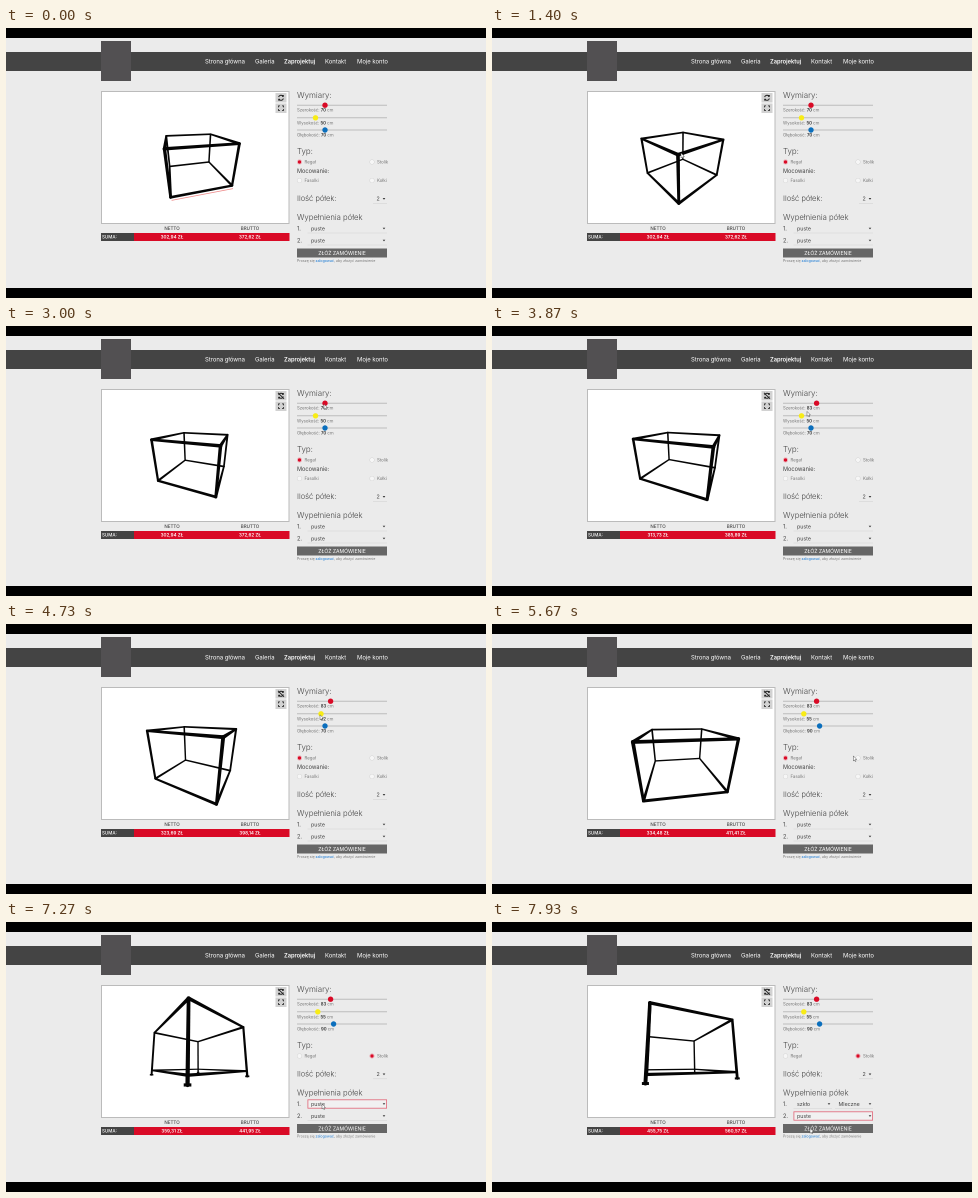
Write an HTML page with a canvas that moves like this. It is 480x270 px and loops after 8000 ms.

```html
<!DOCTYPE html>
<html lang="pl">
<head>
<meta charset="utf-8">
<style>
  html, body { margin: 0; width: 100%; height: 100%; overflow: hidden; background: #000; }
  canvas { display: block; width: 480px; height: 270px; }
</style>
</head>
<body>
<canvas id="stage" width="960" height="540"></canvas>
<script>
const ctx = document.getElementById('stage').getContext('2d');
ctx.scale(2, 2);
const LOOP = 8000;
const RED = '#d90a26', DARK = '#444', INK = '#444', SOFT = '#777', BLACK = '#050505';
const STOP_SPIN = 2150, TABLE_AT = 5950, FOCUS_AT = 6600, GLASS_AT = 7300, SECOND_AT = 7600;

const mix = (a, b, k) => a + (b - a) * k;
const ramp = (t, from, to) => Math.min(1, Math.max(0, (t - from) / (to - from)));

// Everything that moves, as a function of time
function sceneAt(t) {
  const spin = ramp(t, 0, 2750), tilt = ramp(t, TABLE_AT, 6600);
  const yaw = -75 + 53 * spin - 7 * ramp(t, 3500, 4730) + 37 * ramp(t, 4730, 5670)
    + 45 * tilt - 34 * ramp(t, 6750, 7930);
  return {
    t, yaw: yaw * Math.PI / 180,
    pitch: .38 + .06 * Math.sin(Math.PI * spin) - .03 * spin - .5 * tilt,
    w: 70 + 13 * ramp(t, 3100, 3700),
    h: 50 + 12 * ramp(t, 4000, 4400) - 7 * ramp(t, 4750, 4950),
    d: 70 + 38 * ramp(t, 5000, 5150) - 18 * ramp(t, 5150, 5400),
    table: t >= TABLE_AT, glass: t >= GLASS_AT
  };
}

function slidersOf({ w, h, d }) {
  return [
    { label: 'Szerokość', value: w, color: RED, y: 77.2, x: 319 + (w - 70) * .43 },
    { label: 'Wysokość', value: h, color: '#f8ec16', y: 89.8, x: 309.5 + (h - 50) * .46 },
    { label: 'Głębokość', value: d, color: '#0b6fbd', y: 102, x: 319 + (d - 70) * .43 }
  ];
}

function rect(x, y, w, h, color) {
  ctx.fillStyle = color;
  ctx.fillRect(x, y, w, h);
}

function text(str, x, y, size, color = INK, weight = 400, align = 'left') {
  ctx.font = `${weight} ${size}px Inter, "Open Sans", sans-serif`;
  ctx.textAlign = align;
  ctx.fillStyle = color;
  ctx.fillText(str, x, y);
  return x + ctx.measureText(str).width;
}

function line(points, color, width) {
  ctx.beginPath();
  points.forEach(p => ctx.lineTo(p[0], p[1]));
  ctx.strokeStyle = color;
  ctx.lineWidth = width;
  ctx.stroke();
}

function polygon(points, color) {
  ctx.beginPath();
  points.forEach(p => ctx.lineTo(p[0], p[1]));
  ctx.closePath();
  ctx.fillStyle = color;
  ctx.fill();
}

function disc(x, y, r, color) {
  ctx.beginPath();
  ctx.arc(x, y, r, 0, 7);
  ctx.fillStyle = color;
  ctx.fill();
}

const arrowDown = (x, y) => polygon([[x - 1.3, y - .8], [x + 1.3, y - .8], [x, y + .9]], '#333');

function header() {
  rect(0, 0, 480, 270, '#000');
  rect(0, 10, 480, 250, '#ebebeb');
  rect(0, 24, 480, 19, DARK);
  rect(95, 13, 30, 40, '#525052');
  [['Strona główna', 199], ['Galeria', 249], ['Zaprojektuj', 278, 600], ['Kontakt', 319], ['Moje konto', 351]]
    .forEach(([label, x, weight]) => text(label, x, 35.7, weight ? 5.7 : 5.9, '#fff', weight));
}

function viewerFrame(t) {
  rect(95, 63, 188.5, 133, '#bbb');
  rect(96, 64, 186.5, 131, '#fff');
  rect(269.5, 65, 11, 9.5, '#d2d2d2');
  rect(269.5, 75.5, 11, 9.5, '#d2d2d2');
  ctx.strokeStyle = '#222';
  ctx.lineWidth = 1;
  for (const start of [.3, .3 + Math.PI]) {
    ctx.beginPath();
    ctx.arc(275, 69.8, 2.5, start, start + 2.3);
    ctx.stroke();
  }
  rect(276, 67, 1.8, 1.8, '#222');
  rect(272.2, 70.8, 1.8, 1.8, '#222');
  if (t > STOP_SPIN) line([[272, 66.8], [278, 72.8]], '#222', 1);
  for (const sx of [-1, 1]) for (const sy of [-1, 1])
    line([[275 + sx, 80.2 + 2.3 * sy], [275 + 2.5 * sx, 80.2 + 2.3 * sy], [275 + 2.5 * sx, 80.2 + .8 * sy]], '#222', .8);
}

// Orbit camera looking at the middle of the furniture
function makeProjector({ yaw, pitch }) {
  const c = Math.cos(yaw), s = Math.sin(yaw), cp = Math.cos(pitch), sp = Math.sin(pitch);
  return (x, y, z) => {
    const X = x * c + z * s, Z = z * c - x * s;
    const scale = 94 / (124 - Z * cp - y * sp);
    return [189.5 + X * scale, 130 - (y * cp - Z * sp) * scale, scale];
  };
}

function bar(a, b, thickness) {
  const dx = b[0] - a[0], dy = b[1] - a[1], len = Math.hypot(dx, dy) || 1;
  const side = (p, k) => {
    const r = k * p[2] * thickness / 2 / len;
    return [p[0] - dy * r, p[1] + dx * r];
  };
  polygon([side(a, 1), side(b, 1), side(b, -1), side(a, -1)], BLACK);
  for (const p of [a, b]) disc(p[0], p[1], p[2] * thickness / 2, BLACK);
}

function furniture(scene) {
  const { t, w, h, d, table } = scene;
  const project = makeProjector(scene);
  const top = h / 2 + (table ? 2.7 : 0), floor = -top, rail = table ? floor + 6 : floor;
  const corner = (i, y) => {
    const angle = Math.PI / 4 + i * Math.PI / 2;
    return project(Math.sign(Math.sin(angle)) * w / 2, y, Math.sign(Math.cos(angle)) * d / 2);
  };
  if (t < 900) {
    line([0, 1].map(i => corner(i, floor)).map(p => [p[0] + 1, p[1] + 3]), '#e88', .7);
  }
  for (let i = 0; i < 4; i++) {
    bar(corner(i, top), corner(i + 1, top), 2.7);
    bar(corner(i, rail), corner(i + 1, rail), table ? 2.2 : 2.7);
    bar(corner(i, top), corner(i, floor), 2.7);
    if (table) {
      const [x, y, scale] = corner(i, floor);
      rect(x - 2.4 * scale, y - scale, 4.8 * scale, 2 * scale, BLACK);
    }
  }
}

function prices({ w, h, d, table, glass }) {
  const totalLength = Math.round(w) + Math.round(h) + Math.round(d);
  const net = 145.24 + .83 * totalLength + (table ? 24.83 : 0) + (glass ? 96.44 : 0);
  const format = v => v.toFixed(2).replace('.', ',') + ' ZŁ';
  rect(95, 205, 33, 8, DARK);
  rect(128, 205, 155.5, 8, RED);
  text('SUMA:', 96, 210.6, 4.5, '#fff', 500);
  [['NETTO', net, 166], ['BRUTTO', net * 1.23, 244]].forEach(([label, value, x]) => {
    text(label, x, 201.8, 4.5, INK, 500, 'center');
    text(format(value), x, 210.6, 4.5, '#fff', 600, 'center');
  });
}

function slider({ label, value, color, x, y }) {
  line([[291, y], [381, y]], '#bdbdbd', 1);
  disc(x, y, 2.7, color);
  const valueX = text(label + ': ', 291, y + 6.5, 4.3, SOFT);
  const unitX = text(Math.round(value), valueX, y + 6.5, 4.3, '#333', 600);
  text(' cm', unitX, y + 6.5, 4.3, SOFT);
}

function radio(label, x, y, checked) {
  disc(x, y, 2.5, checked ? '#e79aa4' : '#d0d0d0');
  disc(x, y, 2.1, '#f6f6f6');
  if (checked) disc(x, y, 1.7, RED);
  text(label, x + 5, y + 1.6, 4.3, SOFT);
}

function select(label, x, right, y, focused) {
  if (focused) {
    rect(x, y - 6.4, right - x, 9.2, '#e26577');
    rect(x + .8, y - 5.6, right - x - 1.6, 7.6, '#f1f1f1');
  } else {
    line([[x, y + 2.7], [right, y + 2.7]], '#d4d4d4', .6);
  }
  text(label, x + 3.5, y, 5.3);
  arrowDown(right - 3, y - 1.8);
}

function form(scene) {
  const { t, table, glass } = scene;
  text('Wymiary:', 291, 70, 7.9, INK, 300);
  slidersOf(scene).forEach(slider);

  text('Typ:', 291, 126, 7.9, INK, 300);
  radio('Regał', 293.5, 134, !table);
  radio('Stolik', 366, 134, table);
  if (!table) {
    text('Mocowanie:', 291, 145, 5.6);
    radio('Fasolki', 293.5, 152.5);
    radio('Kołki', 366, 152.5);
  }

  ctx.save();
  ctx.translate(0, table ? -18.5 : 0);
  text('Ilość półek:', 291, 173, 7.5, INK, 300);
  text('2', 370.5, 172.6, 5.3);
  arrowDown(378, 170.8);
  line([[367, 175.3], [381, 175.3]], '#d4d4d4', .6);
  text('Wypełnienia półek', 291, 192, 7.7, INK, 300);
  text('1.', 291, 202.3, 5.6);
  text('2.', 291, 214.3, 5.6);
  if (glass) {
    select('szkło', 301.5, 340, 202.3);
    select('Mleczne', 343, 381, 202.3);
  } else {
    select('puste', 301.5, 381, 202.3, t >= FOCUS_AT);
  }
  select('puste', 301.5, 381, 214.3, t >= SECOND_AT);
  rect(291, 220.5, 90, 9, '#666');
  text('ZŁÓŻ ZAMÓWIENIE', 336, 226.8, 5.1, '#fff', 400, 'center');
  const linkX = text('Proszę się ', 291, 234.1, 3.6, SOFT);
  const restX = text('zalogować', linkX, 234.1, 3.6, '#1477d4');
  text(', aby złożyć zamówienie', restX, 234.1, 3.6, SOFT);
  ctx.restore();
}

// The pointer glides from one control to the next and rides along with a dragged thumb
function cursor(scene) {
  const { t } = scene;
  const [width, height, depth] = slidersOf(scene);
  const at = (x, y) => ({ x, y });
  const stops = [
    [900, at(190, 124)], [1750, at(275, 69)], [2500, width], [3700, height], [4750, depth],
    [5400, at(366, 134)], [6200, at(317, 181)], [7350, at(319, 195)], [7650, at(319, 206)]
  ].filter(([start]) => t >= start);
  if (!stops.length) return;
  const [start, goal] = stops.at(-1), [, from] = stops.at(-2) || stops[0];
  const k = ramp(t, start, start + 300);
  const x = mix(from.x, goal.x, k) - 1, y = mix(from.y, goal.y, k) + 1;
  const shape = [[0, 0], [0, 5], [1.2, 4], [2, 5.6], [2.8, 5.2], [2, 3.6], [3.5, 3.5]].map(p => [x + p[0], y + p[1]]);
  polygon(shape, '#fff');
  line([...shape, shape[0]], '#555', .5);
}

function draw() {
  const scene = sceneAt(performance.now() % LOOP);
  header();
  viewerFrame(scene.t);
  furniture(scene);
  prices(scene);
  form(scene);
  cursor(scene);
  requestAnimationFrame(draw);
}
draw();
</script>
</body>
</html>
```
